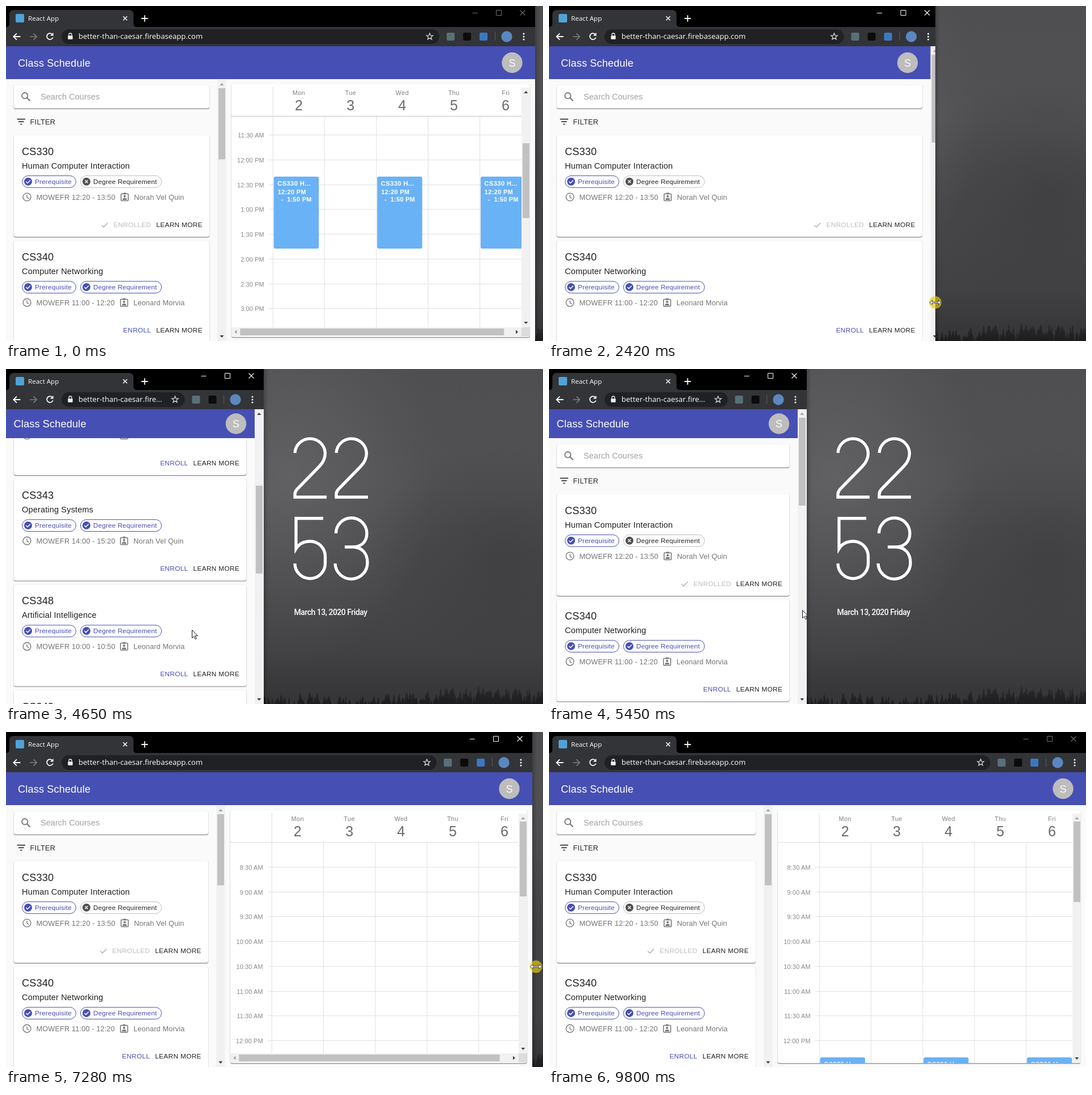
Write an HTML page that moves like this. It is 948 px wide and 591 px high and loops after 9880 ms.

```html
<!DOCTYPE html>
<html lang="en">
<head>
<meta charset="utf-8">
<title>Class Schedule</title>
<style>
html, body { margin: 0; width: 100%; height: 100%; overflow: hidden; background: #48484a; }
svg { display: block; }
text { font-family: "Liberation Sans", Arial, sans-serif; white-space: pre; }
.ui { font-family: "Open Sans", "Noto Sans", sans-serif; }
.date { font-family: Roboto, sans-serif; font-weight: 500; letter-spacing: -.48px; }
</style>
</head>
<body>
<svg width="948" height="591" viewBox="0 0 948 591">
  <defs>
    <linearGradient id="sky" x2="0" y2="1">
      <stop offset="0" stop-color="#4f4f52"/><stop offset=".35" stop-color="#515154"/>
      <stop offset=".62" stop-color="#48484b"/><stop offset=".85" stop-color="#414143"/>
      <stop offset="1" stop-color="#343436"/>
    </linearGradient>
    <radialGradient id="cloud"><stop stop-color="#747477" stop-opacity=".45"/><stop offset="1" stop-color="#747477" stop-opacity="0"/></radialGradient>
    <radialGradient id="dusk"><stop stop-color="#37373a" stop-opacity=".5"/><stop offset="1" stop-color="#37373a" stop-opacity="0"/></radialGradient>
    <linearGradient id="edge"><stop stop-color="#000" stop-opacity=".22"/><stop offset="1" stop-color="#000" stop-opacity="0"/></linearGradient>
    <linearGradient id="forest" gradientUnits="userSpaceOnUse" x1="0" y1="550" x2="0" y2="591">
      <stop offset="0" stop-color="#2c2c2e"/><stop offset="1" stop-color="#19191b"/>
    </linearGradient>
  </defs>
  <g id="desktop"></g>
  <g id="scene"></g>
</svg>
<script>
const LOOP = 9880, H = 591, INDIGO = '#464fb3', GREY = '#757575';
const $ = id => document.getElementById(id);

// Bursts of change: start, end, number of steps
const BURSTS = [[0, 0, 1], [370, 610, 4], [760, 1080, 5], [1390, 2340, 12], [2420, 3300, 12],
  [3770, 4090, 5], [4250, 5210, 13], [5290, 5610, 5], [5920, 6880, 13], [6960, 7440, 7],
  [7610, 7610, 1], [7840, 7840, 1], [8000, 8160, 3], [8400, 8400, 1], [9800, 9800, 1]];

const COURSES = [
  ['CS330', 'Human Computer Interaction', 'MOWEFR 12:20 - 13:50', 'Norah Vel Quin', true],
  ['CS340', 'Computer Networking', 'MOWEFR 11:00 - 12:20', 'Leonard Morvia'],
  ['CS343', 'Operating Systems', 'MOWEFR 14:00 - 15:20', 'Norah Vel Quin'],
  ['CS348', 'Artificial Intelligence', 'MOWEFR 10:00 - 10:50', 'Leonard Morvia'],
  ['CS349', 'Machine Learning', 'MOWEFR 15:30 - 16:50', 'Norah Vel Quin']];

// Timing
function snap(t) {
  const [start, end, n] = BURSTS.filter(b => b[0] <= t).pop();
  if (n === 1) return start;
  const step = (end - start) / (n - 1);
  return start + step * Math.min(n - 1, Math.floor((t - start) / step + 1e-6));
}
function at(keys, t) {
  const i = keys.findIndex(k => k[0] > t);
  if (i < 0) return keys[keys.length - 1][1];
  if (i === 0) return keys[0][1];
  const [t0, a] = keys[i - 1], [t1, b] = keys[i];
  return a + (b - a) * (t - t0) / (t1 - t0);
}
const GROW = [[5840, 455], [6000, 478], [6560, 751], [6880, 866], [7280, 929], [7440, 935],
  [7609, 935], [7610, 938], [7839, 938], [7840, 941], [7999, 941], [8000, 943], [8160, 948]];
function windowWidth(t) {
  if (t < 1310) return 934;
  if (t < 2340) return 934 - 222 * ((t - 1310) / 1030) ** 2;
  if (t < 2420) return 712 - 30 * (t - 2340) / 80;
  if (t < 3300) return 455 + 227 * (1 - (t - 2420) / 880) ** 1.7;
  return at(GROW, t);
}
const scrollAt = t => t > 4170 && t < 5290 ? 420 * Math.sin(Math.PI * (t - 4170) / 1120) ** 2 : 0;

// Drawing helpers
const rect = (x, y, w, h, fill, more = '') => `<rect x="${x}" y="${y}" width="${w}" height="${h}" fill="${fill}" ${more}/>`;
const circle = (x, y, r, fill, more = '') => `<circle cx="${x}" cy="${y}" r="${r}" fill="${fill}" ${more}/>`;
const line = (d, color, w = 1, more = '') => `<path d="${d}" fill="none" stroke="${color}" stroke-width="${w}" ${more}/>`;
const text = (x, y, s, size, fill, spacing = 0, more = '') =>
  `<text x="${x}" y="${Math.round(y)}" font-size="${size}" fill="${fill}" letter-spacing="${spacing}" ${more}>${s}</text>`;
const clip = (x, y, w, h, inner) => `<svg x="${x}" y="${y}" width="${w}" height="${h}" viewBox="${x} ${y} ${w} ${h}">${inner}</svg>`;
const paper = (x, y, w, h) => rect(x - .8, y - .3, w + 1.6, h + 2.3, '#000', 'rx="4" opacity=".09"')
  + rect(x, y + .8, w, h + .6, '#000', 'rx="4" opacity=".3"') + rect(x, y, w, h, '#fff', 'rx="4"');
const END = 'text-anchor="end"', MID = 'text-anchor="middle"';
const arrowHead = (x, y, angle, on) =>
  `<path d="M-3.6 2L0 -2L3.6 2z" transform="translate(${x} ${y}) rotate(${angle})" fill="${on ? '#404040' : '#a0a0a0'}"/>`;
const vbar = (x, top, bottom, thumbY, thumbH, scrolled) => rect(x, top, 15.5, bottom - top, '#f1f1f1')
  + rect(x + 2, thumbY, 12, thumbH, '#c1c1c1')
  + arrowHead(x + 7.8, top + 8, 0, scrolled) + arrowHead(x + 7.8, bottom - 8, 180, true);

function chip(x, y, w, label, ok) {
  const c = ok ? INDIGO : '#505050', cx = x + 11, cy = y + 10.7;
  const mark = ok ? `M${cx - 3.6} ${cy}l2.6 2.7l4.8 -5` : `M${cx - 2.5} ${cy - 2.5}l5 5m0 -5l-5 5`;
  return rect(x + .5, y + .5, w - 1, 20.8, '#fff', `rx="10.4" stroke="${ok ? INDIGO : '#bdbdbd'}"`)
    + circle(cx, cy, 7, c) + line(mark, '#fff', 1.5)
    + text(x + 23, y + 14.8, label, 11.84, ok ? INDIGO : '#262626', .15);
}

function card([code, name, hours, teacher, enrolled], y, right) {
  const bx = enrolled ? 209.5 : 208.5, my = y + 109, button = (dx, s, c) => text(right - dx, y + 162, s, 11.84, c, .338, END);
  return paper(13.5, y, right - 13.5, 179)
    + text(28, y + 35, code, 18.2, '#212121', .14)
    + text(28, y + 59, name, 14.57, '#212121', .137)
    + chip(28, y + 71, 96, 'Prerequisite', true) + chip(131, y + 71, 144, 'Degree Requirement', !enrolled)
    + circle(37, my, 6.9, 'none', `stroke="${GREY}" stroke-width="1.4"`) + line(`M37 ${my - 4}v4.4l3.2 2`, GREY, 1.3)
    + text(53.5, my + 4.6, hours, 12.75, GREY, .137)
    + rect(bx - 6.3, my - 5.8, 12.6, 12.4, 'none', `rx="1" stroke="${GREY}" stroke-width="1.5"`)
    + rect(bx - 2, my - 7.6, 4, 3, GREY) + circle(bx, my - 1.3, 2, GREY)
    + `<path d="M${bx - 4} ${my + 5}q0 -3.2 4 -3.2t4 3.2z" fill="${GREY}"/>`
    + text(bx + 16.5, my + 4.6, teacher, 12.75, GREY, .137)
    + button(12.3, 'LEARN MORE', '#212121')
    + (enrolled ? line(`M${right - 190.5} ${y + 158.5}l3.6 3.6l7.4 -7.6`, '#b4b4b4', 1.5) + button(103, 'ENROLLED', '#bdbdbd')
      : button(103, 'ENROLL', INDIGO));
}

function courseList(right, dy, scroll) {
  const y = 140 - dy - scroll, f = y + 59.7;
  return paper(13.5, y, right - 13.5, 40.5)
    + circle(33.2, y + 18.2, 5.2, 'none', `stroke="${GREY}" stroke-width="1.8"`) + line(`M37 ${y + 22}l5.5 5.5`, GREY, 2.1)
    + text(61, y + 25, 'Search Courses', 14.57, '#a2a2a2')
    + line(`M19.5 ${f}h14.5M22 ${f + 4.4}h9.5M25 ${f + 8.8}h3.6`, '#333', 1.7)
    + text(42.5, y + 69, 'FILTER', 12.75, '#262626', .3)
    + COURSES.map((c, i) => card(c, y + 88 + 186.2 * i, right)).join('');
}

function calendar(w, scroll) {
  const left = w * 5 / 12 + 8.7, right = w - 24, hbar = w < 946, bottom = hbar ? 567 : 584;
  const col = i => left + 73.5 + 91.3 * i, row = i => 239 + 43.72 * i - scroll;
  let head = line(`M${left} 194.5H${right}`, scroll ? '#bdbdbd' : '#dedede') + line(`M${col(0)} 142V195`, '#dedede');
  let body = '';
  ['Mon', 'Tue', 'Wed', 'Thu', 'Fri'].forEach((day, i) => {
    const x = col(i), mid = x + 45.5;
    head += text(mid, 157, day, 10.93, '#808080', .36, MID) + text(mid, 184, i + 2, 25, '#6a6a6a', 0, MID);
    body += line(`M${x} 195V${bottom}`, '#e0e0e0');
  });
  for (let i = 0; i < 16; i++) {
    const hour = 8 + Math.ceil(i / 2), y = row(i);
    const label = `${(hour - 1) % 12 + 1}:${i % 2 ? '00' : '30'} ${hour < 12 ? 'AM' : 'PM'}`;
    body += line(`M${left + 66} ${Math.round(y) - .5}H${right}`, '#e0e0e0')
      + text(left + 58, y + 4, label, 10.93, '#888', .15, END);
  }
  for (const i of [0, 2, 4]) {
    const x = col(i) + 1.3, y = row(7) + 29;
    body += rect(x, y, 79.5, 127, '#6ab2f6', 'rx="3"')
      + text(x + 6.5, y + 16, 'CS330 H...', 11.2, '#fff', .4, 'font-weight="700"')
      + text(x + 7, y + 30.5, '12:20 PM', 10.93, '#fff', .36, 'font-weight="700"')
      + text(x + 13, y + 43.5, '-  1:50 PM', 10.93, '#fff', .3, 'font-weight="700"');
  }
  let out = paper(left, 138, w - 9 - left, 446)
    + clip(left, 138, right - left, 57, head) + clip(left, 195, right - left, bottom - 195, body)
    + vbar(right, 144, bottom, 158 + scroll * .308, hbar ? 132 : 142, scroll);
  if (hbar) {
    const track = right - left, thumb = (track - 31) * track / 529;
    out += rect(left, 567, track, 16, '#f1f1f1') + rect(right, 567, 15, 16, '#dcdcdc')
      + rect(left + 15.5, 569, thumb, 12, '#c1c1c1')
      + arrowHead(left + 7.5, 575, -90, false) + arrowHead(right - 8, 575, 90, true);
  }
  return out;
}

function browser(w, active) {
  const small = w < 500, shift = small ? 29.5 : 0, star = w - 186 + shift, bar = '#333437';
  const url = 'better-than-caesar.firebaseapp.com', room = star - 150;
  const shown = room < 218 ? url.slice(0, Math.floor(room / 6.45)) + '...' : url;
  const points = [...Array(10)].map((_, i) => {
    const r = i % 2 ? 2.6 : 6, a = Math.PI * (i / 5 - .5);
    return `${star + r * Math.cos(a)},${54 + r * Math.sin(a)}`;
  });
  const control = active ? '#fff' : '#707070', b = w - 106;
  return rect(0, 0, w, 71, '#000') + rect(0, 37, w, 34, bar)
    + `<path d="M0 37q6 0 6 -6V15q0 -8 8 -8H217q8 0 8 8V31q0 6 6 6z" fill="${bar}"/>`
    + rect(17, 14, 15, 15, '#4fa3d8', 'rx="2"')
    + text(39, 26, 'React App', 11.6, '#fff', 0, 'class="ui"')
    + line('M206.8 18.3l7 7m0 -7l-7 7', '#fff', 1.5) + line('M239 22h11.5M244.7 16.2v11.5', '#fff', 1.8)
    + line(`M${b - 4.5} 12.5h9`, control) + line(`M${b + 37.5} 7.5h9v9h-9z`, control)
    + line(`M${b + 79.5} 7.5l9 9m0 -9l-9 9`, control, 1.1)
    + line('M25.5 54H13.5M19 48.3L13.3 54l5.7 5.7', '#fff', 1.8)
    + line('M42 54h12M48.5 48.3l5.7 5.7l-5.7 5.7', '#7b7c7f', 1.7)
    + line('M82 50.2A5.5 5.5 0 1 0 82.8 55.5', '#fff', 1.8) + '<path d="M83.6 47v5.6H78z" fill="#fff"/>'
    + rect(98, 41, w - 169 + shift - 98, 26, '#1f2124', 'rx="13"')
    + rect(109.3, 52.3, 8.4, 6.5, '#f0f0f0', 'rx="1"') + line('M111 52.5v-2a2.5 2.5 0 0 1 5 0v2', '#f0f0f0', 1.3)
    + text(128, 58, shown, 13.1, '#fff', 0, 'class="ui"')
    + `<polygon points="${points.join(' ')}" fill="none" stroke="#d8d8d8" stroke-width="1.3"/>`
    + rect(w - 156 + shift, 47, 14, 14, '#587078', 'rx="2"') + rect(w - 127 + shift, 47, 14, 14, '#0b0b0b', 'rx="2"')
    + (small ? '' : rect(w - 98, 47, 14, 14, '#3b78c4', 'rx="2"'))
    + line(`M${w - 70.5} 46v15`, '#5b5c60') + circle(w - 50, 54, 9.7, '#5b87c0')
    + [49, 54, 59].map(y => circle(w - 20, y, 1.5, '#fff')).join('');
}

function page(w, t) {
  const two = w >= 874, wide = w >= 547, scroll = scrollAt(t);
  const right = two ? w : w - 16, bottom = wide ? 129 : 122, dy = wide ? 0 : 7, middle = wide ? 100 : 96.5;
  const column = w * 5 / 12, avatar = right - (wide ? 40.5 : 33);
  return (two
    ? clip(0, bottom, column - 15, H - bottom, courseList(column - 30, 0, 0))
      + vbar(column - 16, 130, H, 145, 125.5, false) + calendar(w, t < 4000 ? 273 : 0)
    : clip(0, bottom, right, H - bottom, courseList(right - 14.5, dy, scroll))
      + vbar(right, 71, H, 86 + scroll * .3, 155, scroll > 1))
    + rect(0, 71, right, bottom - 71, INDIGO)
    + text(wide ? 21 : 13.5, middle + 6.6, 'Class Schedule', 18.2, '#fff', .137)
    + circle(avatar, middle, 18.2, '#bdbdbd') + text(avatar, middle + 6.6, 'S', 18.2, '#fafafa', 0, MID);
}

// Pointer
const place = (x, y, inner) => `<g transform="translate(${x} ${y})">${inner}</g>`;
const pointer = (x, y) => place(x, y, '<path d="M.5 .5V14.5l3.3 -3l2.3 5.2l2.2 -1l-2.3 -5h4.4z" fill="#fff" stroke="#111"/>');
const resizer = (x, y, halo) => place(x, y, (halo ? circle(0, 0, halo, '#e6cc14', 'opacity=".68"') : '')
  + '<path d="M-10 0l4.5 -4v3h11v-3l4.5 4l-4.5 4v-3h-11v3z" fill="#fff" stroke="#222" stroke-width=".8"/>');
function cursor(t) {
  const w = windowWidth(t);
  if (t < 370) return '';
  if (t < 610) return pointer(at([[370, 938], [610, 934]], t), at([[370, 574], [610, 538]], t));
  if (t < 760) return resizer(934.5, 541, 0);
  if (t < 3300) return resizer(w, at([[760, 540], [1080, 538], [2420, 523], [3300, 515]], t), at([[680, 4], [1000, 11]], t));
  if (t < 3770) return '';
  if (t < 5610) return pointer(at([[3770, 384], [4090, 328], [5210, 328], [5450, 447], [5610, 459]], t),
    at([[3770, 513], [4090, 460], [5210, 460], [5450, 425], [5610, 421]], t));
  if (t < 8400) return resizer(t < 7400 ? windowWidth(t + 15) + 6 : w + 6,
    at([[5610, 421], [6560, 425], [7280, 414]], t), 11);
  return '';
}

function scene(t) {
  const w = windowWidth(t), lag = t < 4000 ? 20 : t < 6900 ? 10 : 0, inner = windowWidth(t - lag);
  return rect(w, 0, 8, H, 'url(#edge)')
    + clip(0, 0, w, H, rect(0, 0, w, H, '#fafafa') + page(inner, t)
      + browser(Math.max(w, inner), t >= 1390 && t < 9800))
    + cursor(t);
}

function desktop() {
  let seed = 11, trees = '';
  const random = () => (seed = seed * 16807 % 2147483647) / 2147483647;
  const skyline = [[430, 568], [500, 575], [550, 569], [605, 578], [680, 573], [750, 566], [840, 557], [900, 564], [948, 563]];
  for (let i = 0; i < 130; i++) {
    const x = 440 + i * 4 + random() * 4, y = at(skyline, x) + random() * 20 - 2, r = 2.5 + random() * 3;
    trees += `M${x} ${y}l${r * .5} 8h-1l${r * .7} 9L${x + r} 591H${x - r}L${x - r} ${y + 17}l${r * .7} -9h-1z`;
  }
  const two = 'M510 148A26.8 26.8 0 0 1 563.5 148C563.5 158 560 165 553 172L514 212Q510 216 510 221V226H566';
  const fiveThree = 'M560 263.5H512V317Q520 304 537 304A26.5 26.5 0 0 1 563.5 330.5V343A26.7 26.7 0 0 1 510 343'
    + 'M582.5 290A27.2 27.2 0 0 1 637 290C637 305 627 314 612 314H598M612 314C628 314 638 325 638 341A28.5 28.5 0 0 1 581 343';
  const digits = (d, x) => place(x, 0, line(d, '#000', 7, 'opacity=".16"') + line(d, '#fff', 5.4));
  return rect(0, 0, 948, H, 'url(#sky)')
    + '<ellipse cx="500" cy="190" rx="260" ry="330" fill="url(#cloud)"/>'
    + '<ellipse cx="880" cy="330" rx="240" ry="200" fill="url(#dusk)"/>'
    + `<path d="${trees}" fill="url(#forest)" opacity=".85"/>`
    + digits(two, 0) + digits(two, 73) + digits(fiveThree, 0)
    + text(508.5, 433.5, 'March 13, 2020 Friday', 14, '#fff', -.48, 'class="date"');
}

$('desktop').innerHTML = desktop();
let last = -1;
function frame() {
  const t = snap(performance.now() % LOOP);
  if (t !== last) $('scene').innerHTML = scene(last = t);
  requestAnimationFrame(frame);
}
frame();
</script>
</body>
</html>
```
